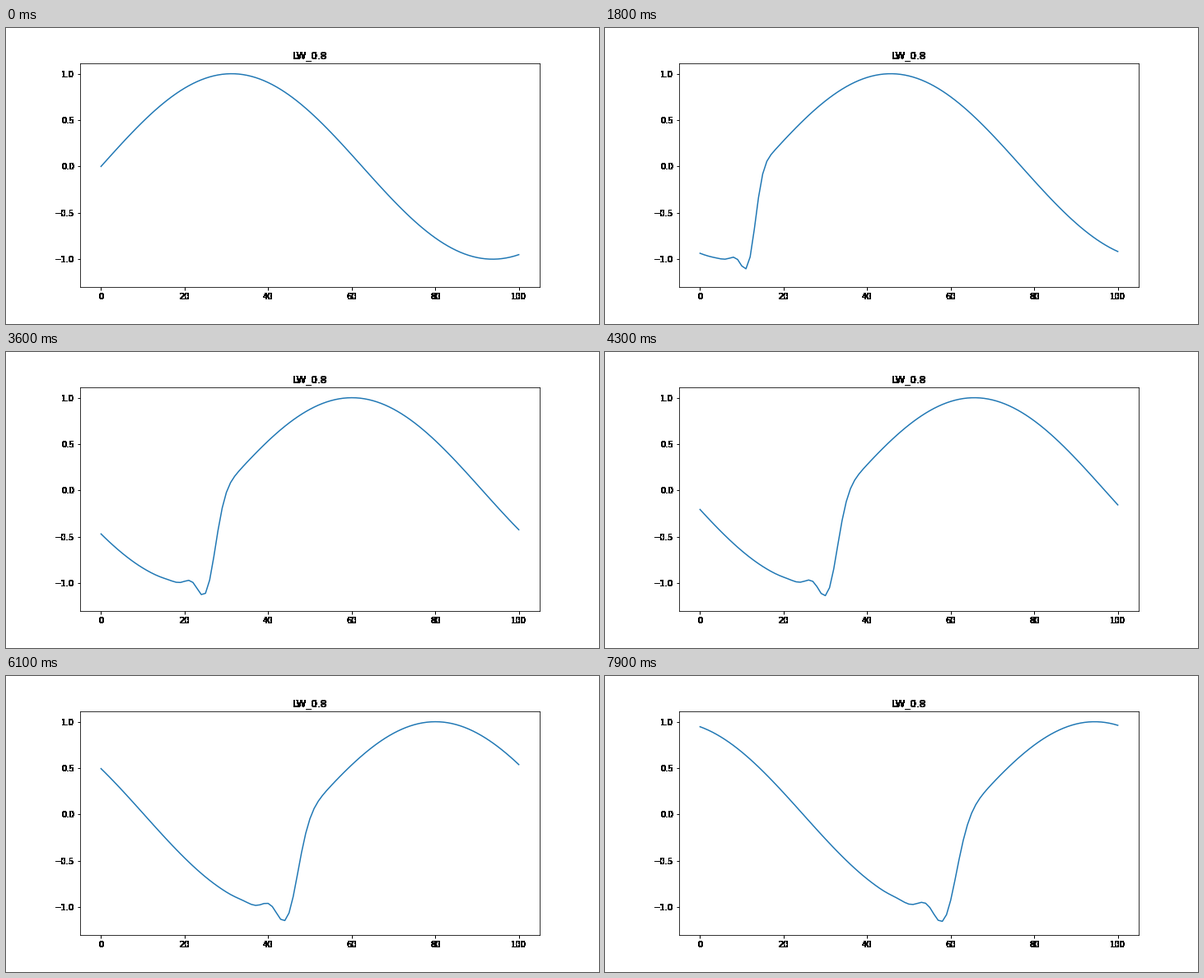
Animation, 720 px wide and 360 px high, one loop 8000 ms. Source, as a matplotlib script:

```python
import numpy as np
import matplotlib.pyplot as plt
from matplotlib.animation import FuncAnimation

FRAMES = 80
INTERVAL = 100
CFL = 0.8

plt.rcParams.update({"font.family": "DejaVu Sans", "font.size": 10})


def lax_wendroff(u):
    """One periodic Lax-Wendroff step of the advection equation."""
    left, right = np.roll(u, 1), np.roll(u, -1)
    return u - CFL / 2 * (right - left) + CFL**2 / 2 * (right - 2 * u + left)


def solid(image, dpi):
    """Turn every touched pixel fully black, for crisp unsmoothed text."""
    out = np.zeros_like(image)
    out[..., 3] = image[..., 3] > 0
    return out, 0, 0


x = np.arange(101)
states = [np.sin(2 * np.pi * x / 125)]
for _ in range(FRAMES - 1):
    states.append(lax_wendroff(states[-1]))

fig, ax = plt.subplots(figsize=(10, 5), dpi=72, facecolor="white")
fig.subplots_adjust(left=0.125, right=0.9, bottom=0.125, top=0.88)
ax.set_xlim(-5, 105)
ax.set_ylim(-1.30, 1.11)
ax.set_xticks(range(0, 101, 20))
ax.set_yticks(np.arange(-1, 1.1, 0.5))
ax.tick_params(width=1)
title = ax.set_title(f"LW_{CFL}", fontsize=12)
for text in [title, *ax.get_xticklabels(), *ax.get_yticklabels()]:
    text.set_agg_filter(solid)

line, = ax.plot(x, states[0], color="#1f77b4", lw=1.5)


def update(i):
    line.set_ydata(states[i])
    return line,


anim = FuncAnimation(fig, update, frames=FRAMES, interval=INTERVAL,
                     repeat=True, repeat_delay=0)
plt.show()
```
